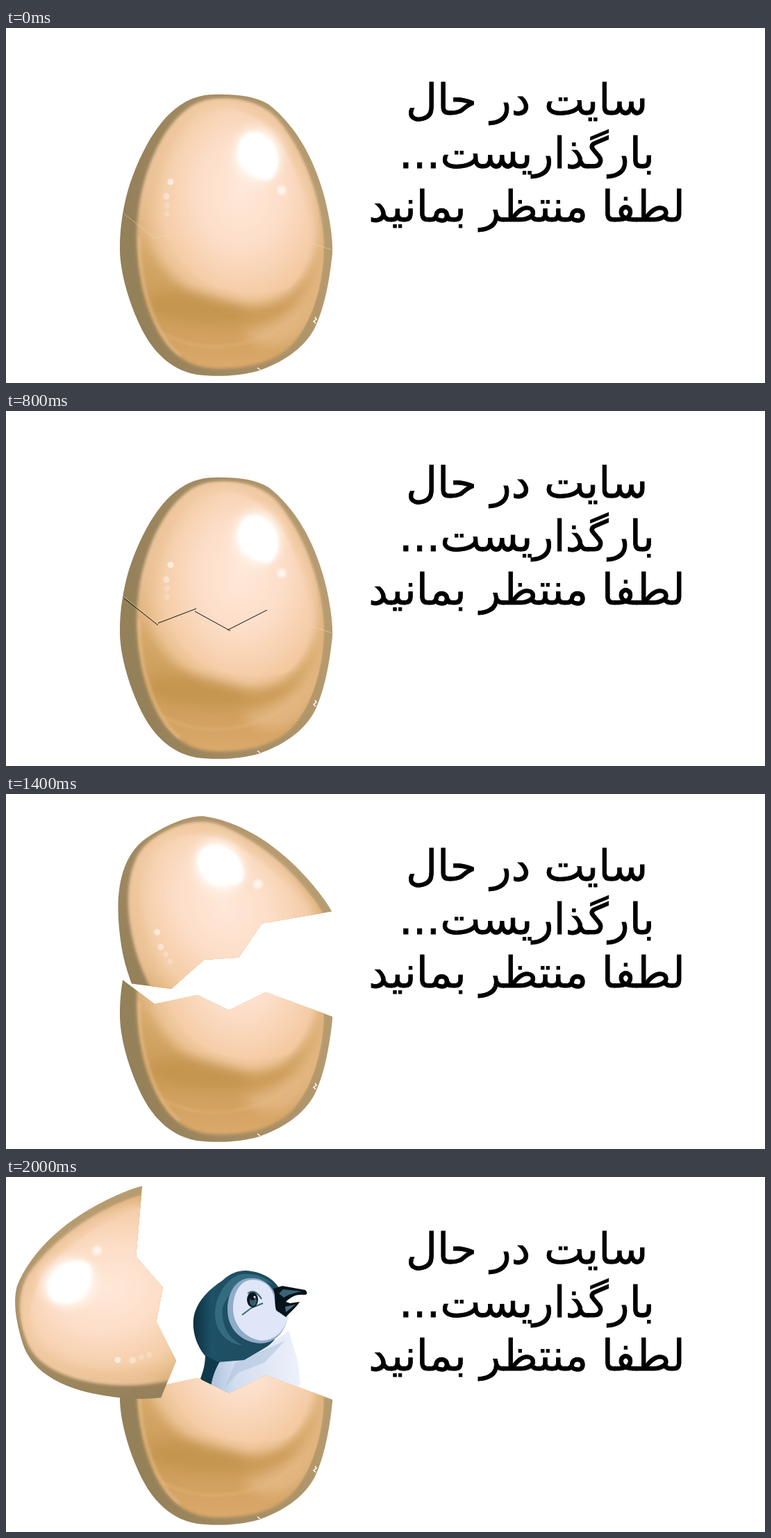
Animation, 1093 px wide and 512 px high, one loop 2500 ms. Source, as an HTML page:

```html
<!DOCTYPE html>
<html lang="fa">
<head>
<meta charset="utf-8">
<title>Hatching loader</title>
<style>
  html, body { margin: 0; width: 100%; height: 100%; overflow: hidden; background: #fff; }
  svg { display: block; }
  text {
    font: 62px "DejaVu Sans", sans-serif; direction: rtl; text-anchor: middle;
    stroke: #000; stroke-width: .8px;
  }
</style>
</head>
<body>
<svg width="1093" height="512" viewBox="0 0 1093 512">
  <defs>
    <linearGradient id="rim" x1="0" y1=".3" x2="1" y2=".1">
      <stop offset="0" stop-color="#948059"/>
      <stop offset=".5" stop-color="#a68d64"/>
      <stop offset="1" stop-color="#bb9f74"/>
    </linearGradient>
    <linearGradient id="shell" x1="0" y1="0" x2="0" y2="1">
      <stop offset="0" stop-color="#f1caa4"/>
      <stop offset=".35" stop-color="#e9c096"/>
      <stop offset=".58" stop-color="#d5a869"/>
      <stop offset=".78" stop-color="#cb9b56"/>
      <stop offset="1" stop-color="#dba96b"/>
    </linearGradient>
    <radialGradient id="glow" cx=".52" cy=".45" r=".58">
      <stop offset="0" stop-color="#ffebdf"/>
      <stop offset=".5" stop-color="#fee0cd"/>
      <stop offset="1" stop-color="#f4caa2"/>
    </radialGradient>
    <linearGradient id="plumage" x1="0" y1="0" x2="1" y2="0">
      <stop offset="0" stop-color="#0c2f40"/>
      <stop offset=".2" stop-color="#1d5166"/>
      <stop offset="1" stop-color="#21495c"/>
    </linearGradient>
    <linearGradient id="down" x1="0" y1="0" x2="1" y2="0">
      <stop offset="0" stop-color="#9db6d3"/>
      <stop offset=".35" stop-color="#d3def0"/>
      <stop offset="1" stop-color="#eef1fb"/>
    </linearGradient>
    <filter id="soft"><feGaussianBlur stdDeviation="2"/></filter>
    <filter id="blur" x="-30%" y="-30%" width="160%" height="160%"><feGaussianBlur stdDeviation="8"/></filter>
    <path id="inner" d="M305 102C342 100 372 111 390 130C428 176 452 240 457 300C461 360 443 420 416 452C390 482 350 492 300 491C250 488 225 457 208 415C190 370 185 310 190 270C196 210 222 150 255 122C270 108 285 103 305 102Z"/>
    <clipPath id="innerClip"><use href="#inner"/></clipPath>
    <clipPath id="topClip"><path d="M100 0V216L168 268 214 303 276 290 321 312 374 286 470 321 520 339V0Z"/></clipPath>
    <clipPath id="bottomClip"><path d="M100 512V216L168 268 214 303 276 290 321 312 374 286 470 321 520 339V512Z"/></clipPath>

    <g id="egg">
      <path fill="url(#rim)" d="M298 96C330 95 358 98 378 110C417 140 443 188 457 238C466 270 471 305 470 325C466 365 458 405 445 432C428 465 395 483 365 494C335 503 300 503 275 500C240 494 215 470 199 441C178 402 163 350 164 315C164 280 172 240 183 212C205 155 240 97 298 96Z"/>
      <use href="#inner" fill="url(#shell)" filter="url(#soft)"/>
      <g clip-path="url(#innerClip)">
        <path fill="#e2b580" filter="url(#blur)" d="M455 270C450 370 420 420 340 440C390 490 470 440 480 300Z"/>
        <path fill="#edc496" filter="url(#blur)" d="M310 106C395 104 450 230 448 300C444 360 405 405 345 400C265 395 208 350 202 275C206 190 250 110 310 106Z"/>
        <path fill="#f7d3b3" filter="url(#blur)" d="M315 110C390 110 440 210 444 295C440 350 400 385 345 383C275 378 232 325 222 270C218 200 255 112 315 110Z"/>
        <path fill="url(#glow)" filter="url(#soft)" opacity=".85" d="M318 118C382 118 428 205 436 285C439 330 425 365 405 376C380 386 325 384 292 368C258 350 240 325 233 285C226 220 260 122 318 118Z"/>
        <ellipse cx="275" cy="404" rx="70" ry="20" transform="rotate(8 275 404)" fill="#bd9049" opacity=".5" filter="url(#blur)"/>
        <path fill="none" stroke="#e8bd8a" stroke-width="3" opacity=".5" filter="url(#soft)" d="M225 440C290 475 370 460 425 410"/>
        <path fill="none" stroke="#f2d0ac" stroke-width="3" opacity=".6" filter="url(#soft)" d="M191 300C192 370 212 440 250 472"/>
      </g>
      <ellipse cx="362" cy="184" rx="35" ry="40" fill="#fff6ee" filter="url(#blur)"/>
      <path fill="#fff" filter="url(#soft)" d="M345 153C365 142 388 160 392 185C393 207 385 221 372 219C350 214 334 203 333 182C334 167 338 158 345 153Z"/>
      <g fill="#fff6ee">
        <circle cx="397" cy="234" r="6.5" filter="url(#soft)"/>
        <circle cx="237" cy="222" r="4.5" opacity=".7"/>
        <circle cx="231" cy="243" r="4.5" opacity=".5"/>
        <circle cx="232" cy="256" r="4" opacity=".25"/>
        <circle cx="232" cy="268" r="4" opacity=".25"/>
      </g>
      <path fill="none" stroke="#fff" stroke-width="1.5" d="M445 417l2 3-4 3 3 3M362 490l4 3"/>
    </g>
  </defs>

  <text x="750" y="125">سایت در حال</text>
  <text x="750" y="202">بارگذاریست...</text>
  <text x="750" y="279">لطفا منتظر بمانید</text>

  <g id="whole">
    <use href="#egg"/>
    <path fill="none" stroke="#f5dcc2" opacity=".5" d="M170 268L214 303 275 290M433 308L469 320"/>
    <g id="cracks" stroke="#111">
      <path d="M170 270L219 309"/>
      <path d="M219 306L274 285"/>
      <path d="M272 289L323 317"/>
      <path d="M319 316L376 287"/>
      <path d="M374 287L470 320"/>
    </g>
  </g>

  <g id="chick">
    <path fill="url(#down)" d="M290 260L375 244 408 222C411 240 417 252 420 265L424 299 400 330H280Z"/>
    <path fill="#a9bfda" opacity=".5" d="M330 268L402 236 372 268 335 282 315 304Z"/>
    <path fill="#11394c" d="M287 256L308 266C300 280 297 290 295 303L280 291C283 282 287 272 287 256Z"/>
    <path fill="url(#plumage)" d="M345 135C370 136 387 149 393 160L400 200C396 226 385 240 372 247L343 264 306 267 286 257C272 240 266 215 272 195C278 177 292 162 312 149C322 140 332 135 345 135Z"/>
    <path fill="#356b80" d="M340 140C362 138 378 148 384 155C355 138 322 160 312 188C309 214 322 236 342 243C305 239 294 204 305 175C313 155 325 143 340 140Z"/>
    <path fill="#8fabc7" d="M344 147C366 141 385 156 388 172L406 201C402 224 387 240 366 240C338 238 319 219 319 191C319 170 328 152 344 147Z"/>
    <path fill="#dfe6f7" d="M349 149C369 145 384 158 386 174L390 194 406 201C402 222 387 236 368 236C345 233 327 214 327 190C327 170 335 153 349 149Z"/>
    <path fill="#06131a" d="M385 161L398 157 431 163C435 167 434 170 429 170C419 169 411 172 403 180L409 182 423 180C418 188 411 193 403 202L389 192C386 182 389 172 385 161Z"/>
    <path fill="#3a6477" d="M399 162L426 165C416 167 407 169 400 174L393 168Z"/>
    <path fill="#4b6f80" d="M402 187L417 184 403 195Z"/>
    <path fill="none" stroke="#3d6278" stroke-width="2" d="M340 199L353 189 370 182M348 168C355 162 362 166 368 176"/>
    <ellipse cx="355" cy="177" rx="8" ry="11" fill="#081820"/>
    <ellipse cx="356" cy="179" rx="5" ry="7" fill="#385c6d"/>
    <circle cx="355" cy="175" r="3" fill="#081820"/>
    <circle cx="358" cy="173" r="1.5" fill="#fff"/>
  </g>

  <g id="halves">
    <g clip-path="url(#bottomClip)"><use href="#egg"/></g>
    <g id="lid"><g clip-path="url(#topClip)"><use href="#egg"/></g></g>
  </g>
</svg>
<script>
  const STEP = 200, LOOP = 2500, LAST_STEP = 10, SPLIT = 6, HATCH = 8;
  // Position of the hinge point (214, 303) and tilt of the lid
  const lidPoses = [[219.5, 300.6, -15], [238, 281, -29.8], [245, 265, -105]];
  const chickDrops = [92, 44, 0];
  const $ = id => document.getElementById(id);
  const show = (el, on) => el.style.display = on ? "" : "none";

  function draw(now) {
    const step = Math.min(LAST_STEP, Math.floor(now % LOOP / STEP));
    show($("whole"), step < SPLIT);
    show($("halves"), step >= SPLIT);
    show($("chick"), step >= HATCH);
    [...$("cracks").children].forEach((crack, i) => show(crack, i < step));
    if (step >= SPLIT) {
      const [x, y, tilt] = lidPoses[Math.min(step - SPLIT, 2)];
      $("lid").setAttribute("transform", `translate(${x} ${y}) rotate(${tilt}) translate(-214 -303)`);
    }
    if (step >= HATCH) $("chick").setAttribute("transform", `translate(0 ${chickDrops[step - HATCH]})`);
  }

  const start = performance.now();
  (function tick() {
    draw(performance.now() - start);
    requestAnimationFrame(tick);
  })();
</script>
</body>
</html>
```
